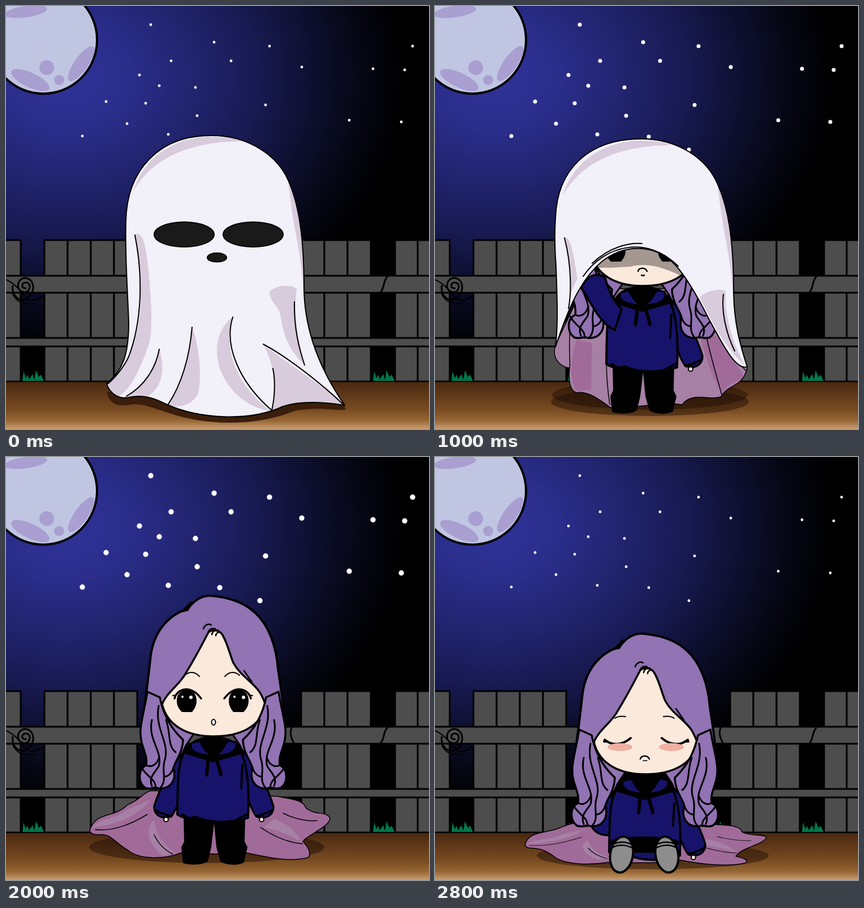
Animation, 748 px wide and 748 px high, one loop 3000 ms. Source, as an HTML page:

```html
<!DOCTYPE html>
<html lang="en">
<head>
<meta charset="utf-8">
<title>Ghost costume</title>
<style>
html, body { margin: 0; width: 100%; height: 100%; overflow: hidden; background: #000; }
svg { display: block; width: 100vw; height: 100vh; stroke-linecap: round; stroke-linejoin: round; }
</style>
</head>
<body>
<svg id="stage" viewBox="0 0 748 748"></svg>
<script>
const SHEET = '#f2f0f8', FOLD = '#d8cbdc', LINING = '#a06b99', SHEEN = '#a780a5';
const HAIR = '#9273b3', SKIN = '#fbe9dc', NAVY = '#17136b';
const STEP = 200, LOOP = 3000;

const fill = (d, color, width = 0) =>
  `<path d="${d}" fill="${color}"${width ? ` stroke="#000" stroke-width="${width}"` : ''}/>`;
const line = (d, width = 2) => `<path d="${d}" fill="none" stroke="#000" stroke-width="${width}"/>`;
const oval = (x, y, rx, ry, color, turn = 0, width = 0) =>
  `<ellipse cx="${x}" cy="${y}" rx="${rx}" ry="${ry}" fill="${color}" transform="rotate(${turn} ${x} ${y})"` +
  `${width ? ` stroke="#000" stroke-width="${width}"` : ''}/>`;
const rect = (x, y, w, h, color, width = 3) =>
  `<rect x="${x}" y="${y}" width="${w}" height="${h}" fill="${color}"${width ? ` stroke="#000" stroke-width="${width}"` : ''}/>`;
const move = (x, y, s) => `<g transform="translate(${x} ${y})">${s}</g>`;
const pair = (s, sum = 732) => s + `<g transform="translate(${sum}) scale(-1 1)">${s}</g>`;
const lerp = (a, b, k) => a + (b - a) * k;

// Blends two paths that share the same commands.
function mix(a, b, k) {
  const goal = b.match(/-?[\d.]+/g);
  let i = 0;
  return a.replace(/-?[\d.]+/g, n => +lerp(+n, +goal[i++], k).toFixed(1));
}

function scenery() {
  const planks = [-16, 68, 109, 150, 191, 522, 563, 604, 688, 728];
  const grass = 'M0 663l2-17 4 12 3-6 3 8 6-9 3 10 3-17 5 12 4-4 5 11z';
  return `<defs>
    <radialGradient id="sky" gradientUnits="userSpaceOnUse" cx="0" cy="0" r="1"
      gradientTransform="translate(105 125) scale(600 490)">
      <stop offset="0" stop-color="#2f339a"/><stop offset=".2" stop-color="#2a2d89"/>
      <stop offset=".55" stop-color="#191b55"/><stop offset=".85" stop-color="#070818"/><stop offset="1"/>
    </radialGradient>
    <linearGradient id="soil" x2="0" y2="1">
      <stop offset="0" stop-color="#482710"/><stop offset=".6" stop-color="#7a4c22"/>
      <stop offset=".82" stop-color="#966634"/><stop offset="1" stop-color="#c99d70"/>
    </linearGradient></defs>` +
    rect(0, 0, 748, 748, 'url(#sky)', 0) +
    oval(66, 60, 95, 95, '#c0c6e1', 0, 4) +
    oval(35, 10, 38, 10, '#a99fd1', -8) + oval(43, 131, 37, 13, '#a99fd1', 25) +
    oval(72, 109, 13, 13, '#a99fd1') + oval(94, 131, 9, 9, '#a99fd1') + oval(133, 102, 37, 12, '#a99fd1', -55) +
    planks.map(x => rect(x, 414, x < 0 ? 42 : 41, 250, '#4d4d4d')).join('') +
    rect(-4, 477, 756, 30, '#4d4d4d') + rect(-4, 587, 756, 15, '#4d4d4d') +
    line('M674 479C666 488 670 497 663 505M505 479C501 489 505 498 509 506', 3) +
    line('M0 484C15 490 25 503 35 515C45 525 57 520 64 513M12 510C22 528 36 527 49 526') +
    line('M35 499C26 500 27 488 36 489C46 490 43 508 31 506C15 503 20 479 36 481C54 485 52 514 30 520C17 519 10 507 12 495', 3) +
    [29, 235, 480, 649].map(x => move(x, 0, fill(grass, '#00774a'))).join('') +
    rect(0, 664, 748, 84, 'url(#soil)', 0) + line('M0 664H748', 2);
}

const STARS = [[256, 33], [368, 64], [466, 71], [719, 71], [292, 97], [398, 97], [523, 108], [649, 111],
  [705, 113], [236, 122], [271, 141], [335, 144], [177, 169], [247, 172], [459, 175], [338, 194],
  [607, 202], [699, 205], [214, 208], [287, 227], [135, 230], [378, 231], [449, 254]];
const stars = r => STARS.map(([x, y]) => oval(x, y, r, r, '#fff')).join('');

// Sheet outlines: hanging, half lifted, pulled up to the face, nearly off.
const DRAPE = [
  'M363 229C430 229 480 265 499 308C518 350 527 410 527 500C528 580 560 650 599 706C560 700 520 698 490 708C430 736 340 730 283 704C240 682 222 692 210 693C195 693 182 682 178 668C205 645 217 620 217 560C215 500 210 440 212 380C214 290 270 229 363 229Z',
  'M356 237C425 237 470 275 489 318C508 360 519 420 519 500C522 590 545 660 591 714C560 710 520 705 490 715C440 730 395 712 375 675C350 610 330 570 300 548C270 540 235 540 218 556C216 540 214 520 213 495C211 450 209 420 210 385C214 295 266 237 356 237Z',
  'M365 235C430 235 482 270 501 318C520 360 528 420 528 500C528 560 540 600 552 638C530 645 505 590 485 555C465 515 445 480 425 458C390 420 335 420 295 452C255 485 232 545 213 603C218 560 216 520 214 460C211 420 212 390 213 375C216 290 270 235 365 235Z',
  'M365 222C440 222 492 270 510 318C530 360 540 420 545 490C550 540 558 580 566 620C545 620 520 560 500 500C485 440 460 380 430 342C395 310 325 310 290 345C250 390 220 470 195 560C196 530 200 490 204 450C205 420 208 390 212 360C222 280 280 222 365 222Z'
];
const INSIDE = [
  'M220 553C212 580 225 600 237 612C230 640 240 665 260 676C280 676 300 685 310 705C340 712 380 712 400 705C410 705 420 705 430 705C440 700 460 700 470 700L480 560L300 530Z',
  'M213 600C205 625 225 640 238 640C235 665 240 680 250 684C270 680 290 695 310 710C350 712 400 700 437 705C455 680 490 700 507 690C515 670 545 675 552 640L500 500L260 500Z'
];

const crown = fill('M225 328C240 275 290 233 360 231C385 231 405 234 417 239C330 240 260 265 225 328Z', FOLD) +
  fill('M499 308C508 330 520 370 525 410C528 450 527 480 526 500C520 420 508 400 499 308Z', FOLD);
const patch = fill('M466 505C478 493 505 492 514 500C510 540 510 560 528 634C500 610 490 580 486 550C482 525 468 530 466 505Z', FOLD) +
  line('M510 523C509 570 518 605 528 635');
const tail = fill('M401 550C366 575 365 630 392 668C415 702 448 714 468 716C420 680 380 620 401 550Z', FOLD) +
  fill('M455 598C500 635 560 670 597 705C540 697 500 702 472 714C478 680 477 640 455 598Z', FOLD) +
  line('M401 550C385 600 412 665 470 715C476 690 476 660 472 641M455 598C500 622 560 670 597 705');
const pleats = fill('M228 405C237 398 245 410 250 450C258 520 260 580 252 600C235 650 215 685 195 692C185 690 178 678 178 668C215 640 240 580 238 510C238 470 235 430 228 405Z', FOLD) +
  fill('M271 607C285 650 270 680 250 690C235 686 222 688 210 692C245 670 265 640 271 607Z', FOLD) +
  fill('M329 568C345 610 345 660 340 685C330 705 310 712 285 706C310 670 325 620 329 568Z', FOLD) +
  line('M228 405C243 480 240 560 217 620C208 640 190 660 180 668M271 607C265 640 245 672 213 690M329 568C325 620 310 670 287 704');
const lifted = fill('M222 365C231 370 228 440 236 502L218 495C215 440 216 400 222 365Z', FOLD) +
  fill('M258 497C300 490 330 510 345 541C320 522 300 505 258 497Z', FOLD) +
  line('M220 372C215 420 219 460 221 490M258 497C300 490 330 510 345 541M222 546C260 520 315 530 340 578M235 541C270 529 310 538 335 575');
const gathered = fill('M229 410C240 405 245 440 252 482L238 512C240 470 236 440 229 410Z', FOLD) +
  fill('M468 515C485 500 510 500 514 505C512 560 530 600 548 636C510 600 490 560 468 515Z', FOLD) +
  line('M229 410C242 460 241 510 236 535M510 510C506 540 515 580 530 610M262 478C300 422 375 405 430 460M278 455C310 425 345 418 366 420');

const FOLDS = {
  hang: crown + pleats + patch + tail,
  rise: move(-5, -2, crown) + move(-5, -24, patch) + move(-5, 4, tail) +
    move(-4, -40, fill('M228 405C245 398 258 500 252 600L228 620C241 550 240 470 228 405Z', FOLD) + line('M228 405C243 480 240 540 230 600')),
  lift: move(-9, 8, crown) + move(-10, -45, patch) + move(-10, 8, tail) + lifted,
  open: move(1, 7, crown) + gathered
};

let clips = 0;
function ghost({ from, to = from, k = 0, folds, eyes }) {
  const d = mix(DRAPE[from], DRAPE[to], k), id = 'sheet' + clips++;
  const face = eyes ? pair(oval(eyes.x - 58, eyes.y, 53, eyes.h, '#1a1a1a', 0, 2), (eyes.x + 3) * 2) +
    oval(eyes.x, eyes.y + eyes.h * 1.85, 17, eyes.h * .36, '#1a1a1a', 0, 2) : '';
  return `<clipPath id="${id}"><path d="${d}"/></clipPath>` + fill(d, SHEET) +
    `<g clip-path="url(#${id})">${FOLDS[folds]}${face}</g>` + line(d, 2);
}
const inside = k => fill(mix(...INSIDE, k), SHEEN, 1.5) +
  fill(mix('M300 575L308 590L300 702C285 682 272 676 262 672C285 640 290 610 300 575Z',
    'M250 590L278 596L276 678C260 680 252 684 247 676C236 650 242 620 250 590Z', k), LINING) +
  (k > .4 ? fill('M470 590L505 580C515 620 540 640 546 655C530 668 515 668 508 684C485 650 480 620 470 590Z', LINING) +
    line('M306 590C300 630 304 670 309 705M480 585C490 630 500 660 507 688M508 575C520 610 535 630 550 645M240 560C235 600 240 630 238 640', 1.5) :
    line('M245 585C240 620 255 655 262 674M290 590C288 630 284 660 268 675', 1.5));

// Fallen cloth behind the girl.
const BILLOW = 'M486 355C500 362 515 375 535 378C555 385 548 410 550 430C555 460 585 455 594 475C598 500 570 525 560 550C535 590 540 620 540 636C565 660 562 690 555 705C530 716 490 714 460 708C420 700 380 690 355 680C330 690 310 700 285 695C250 690 225 670 230 645C215 625 215 600 210 580C200 565 170 565 167 545C165 525 178 510 180 500C172 470 178 445 195 432C210 415 235 410 250 402Z';
const HEAP = 'M148 660C160 625 190 640 215 615C240 605 245 590 260 590L480 600C500 605 525 605 530 620C545 635 570 625 573 640C570 655 530 670 525 680C535 690 540 700 535 708C500 718 450 705 425 700C390 705 340 700 310 700C280 712 235 712 215 695C190 680 185 665 165 668C155 668 148 665 148 660Z';
const FLAT = 'M164 685C170 660 200 665 225 655C250 645 255 645 270 645L485 648C510 650 545 648 548 662C560 670 590 665 591 672C585 685 545 690 537 705C552 708 560 712 554 717C520 725 470 718 440 712C390 720 330 715 310 716C270 722 230 718 215 705C195 690 185 692 170 690C165 688 164 687 164 685Z';

const billow = fill(BILLOW, LINING, 1.5) +
  fill('M486 375C505 405 540 415 550 432C555 455 585 455 594 475C560 455 520 445 490 425Z', SHEEN) +
  fill('M168 553C195 540 220 515 242 490L242 520C215 540 195 550 175 558Z', SHEEN) +
  fill('M212 580C240 600 270 640 290 695L310 690C282 650 270 600 255 570Z', SHEEN) +
  fill('M480 560C500 600 525 625 541 637C537 615 540 600 548 575L505 560Z', SHEEN) +
  line('M176 557C195 550 215 540 240 520M260 590C270 630 285 670 307 695M495 425C520 440 550 445 575 455M430 650C440 670 450 690 460 705M508 575C520 600 535 625 548 638', 1.5);
const heap = k => fill(mix(HEAP, FLAT, k), LINING, 1.5) +
  move(lerp(0, 14, k), lerp(0, 330, k), `<g transform="scale(1 ${lerp(1, .54, k)})">` +
    fill('M152 655C170 636 195 642 215 623L255 607C235 630 210 648 152 655Z', SHEEN) +
    fill('M262 642C245 655 250 685 278 705L300 700C275 685 265 665 262 642Z', SHEEN) +
    fill('M455 655C485 660 500 670 523 680C510 660 500 650 475 640Z', SHEEN) +
    line('M158 659C190 662 220 650 250 632M262 668C270 685 280 695 295 702M450 655C475 672 500 682 524 684M490 630C510 640 535 645 550 643', 1.5) + '</g>');
const shade = (...ovals) => `<g opacity=".45">${ovals.map(([x, y, rx, ry]) => oval(x, y, rx, ry, '#1c0d03')).join('')}</g>`;
const hemShade = fill('M178 682C182 705 200 710 225 704C260 704 290 728 360 735C430 742 480 728 510 716C550 708 580 716 600 714L598 702L300 690Z', '#3a1e0b');
const fenceShade = `<g opacity=".4">${fill('M212 590C180 590 165 602 173 630C168 645 160 655 170 661L235 664V600Z', '#111') +
  fill('M540 600C570 595 590 605 592 620C580 640 560 650 555 662L535 640Z', '#111')}</g>`;

// Girl, standing position.
const lock = fill('M250 415C244 455 233 480 240 505C244 520 250 530 248 545C233 552 233 575 246 585C258 589 262 582 270 586C292 588 302 570 296 550C300 535 312 525 313 500C300 488 280 465 272 425Z', HAIR, 3.5) +
  line('M258 465C250 500 278 520 270 547C262 560 252 566 258 582M270 440C262 480 290 505 281 535C274 555 286 570 273 585M283 465C292 490 285 510 300 522M248 545C258 550 268 543 271 530M239 548C248 565 268 572 264 586M296 550C292 562 284 566 279 565', 3);
const cap = fill('M322 268C335 250 350 243 368 246C397 249 422 258 440 275C465 297 478 335 481 375C484 395 488 420 490 440C485 455 470 458 459 452L276 452C260 460 250 455 245 440C250 405 252 385 256 350C262 310 285 280 322 268Z', HAIR, 4) +
  fill('M310 274L327 256L322 271Z', '#000', 2);
const visage = pair(oval(273, 446, 6, 11, SKIN, 0, 3)) +
  fill('M276 437C285 415 308 402 318 382C333 358 345 335 358 310C365 304 378 306 383 315C392 330 396 350 402 364C415 388 440 400 450 418C455 428 458 433 459 440C450 478 412 494 367 494C320 494 285 475 276 437Z', SKIN, 3.5) +
  line('M349 304C351 297 358 294 363 297M357 312C358 305 364 302 370 304M364 314C365 308 371 304 376 307M371 316C371 311 377 308 381 311M421 378L435 398', 2.5);

const openEyes = pair(fill('M302 431C302 405 337 405 337 431C337 440 333 446 329 451H311C306 446 302 440 302 431Z', '#000') +
  line('M298 427C303 409 326 402 345 427', 3.5) + line('M295 422L301 421', 2), 731) +
  oval(327, 425, 3, 3, '#fff') + oval(420, 425, 3, 3, '#fff') + oval(312, 424, 2, 2, '#fff') + oval(404, 424, 2, 2, '#fff');
const shutEyes = pair(line('M295 433C308 444 326 443 341 430M300 436L294 436', 4), 737);
const blush = y => pair(oval(322, y, 22, 7, '#efb0a2'), 735);
const lowBrows = pair(line('M313 395C319 391 325 391 332 392'), 731);
const frown = line('M359 468C361 461 372 461 375 468M365 475C367 476 369 476 370 475', 2.5);
const LOOKS = {
  sad: lowBrows + openEyes + frown,
  open: pair(line('M316 386C325 378 335 380 342 388'), 729) + openEyes + oval(367, 469, 3.5, 5, '#fff', 0, 2),
  smile: lowBrows + openEyes + blush(458) + line('M359 463C362 470 373 470 376 463', 2.5),
  sleep: lowBrows + shutEyes + blush(446) + line('M358 467C360 460 371 460 374 467', 2.5) + line('M363 470H370', 1.5)
};

const sleeve = fill('M316 520C292 545 270 590 262 618C262 632 272 641 292 636C304 620 308 600 316 570Z', NAVY, 3.5) +
  line('M264 625C273 628 285 636 293 634', 4) + oval(283, 641, 4, 4, SKIN, 0, 2);
const raised = fill('M318 522C300 535 285 555 270 578C272 596 290 606 312 600Z', NAVY, 3.5) +
  fill('M318 515L302 532L312 545Z', '#000') + oval(291, 520, 6, 6, SKIN, 0, 3);
const reaching = fill('M258 497C270 475 285 470 300 478C306 500 315 520 330 535L318 572C290 560 275 520 258 497Z', NAVY, 4);
const ARMS = { down: sleeve, raised, reaching };
const torso = fill('M318 518C302 540 304 580 303 632C315 640 325 640 335 636C360 648 395 648 428 638C430 600 430 550 414 518Z', NAVY, 4) +
  line('M312 632L320 637M405 643L425 632M418 545L416 585', 4);
const hood = fill('M314 524C322 500 345 494 366 494C392 494 412 502 420 524L366 540Z', '#000') +
  fill('M328 506C322 520 340 527 362 528L352 518L342 502Z', NAVY, 3) + fill('M406 504C412 520 394 527 372 528L382 518L392 502Z', NAVY, 3) +
  fill('M351 490H383V496L366 522Z', '#000') + line('M357 530C358 545 355 553 355 562M372 530C374 545 379 553 380 562', 6);
const LEGS = {
  stand: fill('M314 634H423L422 680L427 690L421 717C410 723 388 722 379 715L372 690L368 648L363 690L357 715C348 722 325 722 313 718L310 690L315 680Z', '#000'),
  sit: pair(fill('M303 690C303 657 315 647 340 647C360 647 366 660 363 690L361 710C350 722 325 722 312 717Z', '#000'), 735) + line('M354 678H382', 5),
  feet: fill('M308 680C320 668 420 668 432 680L420 700H320Z', '#000') +
    pair(oval(330, 703, 20, 32, '#8d8d8d', 10, 4) + line('M313 691C325 684 340 686 350 692M316 684C328 679 340 681 350 686', 2.5), 740)
};

function girl({ x = 0, y = 0, look = 'sad', arm = 'raised', legs = 'stand' }) {
  const right = `<g transform="translate(735) scale(-1 1)">${sleeve}</g>`;
  const nape = pair(fill('M285 465L300 550L318 510L335 485Z', HAIR, 3));
  const upper = move(x, y, nape + ARMS[arm] + right + torso + hood + cap + visage + LOOKS[look] + pair(lock) + (arm === 'reaching' ? reaching : ''));
  return legs === 'stand' ? LEGS.stand + upper : upper + LEGS[legs];
}
const faceShade = '<path d="M280 420H450V484C410 465 380 452 345 461C320 462 300 464 285 462Z" opacity=".35"/>';

const under = [210, 700, 60, 16], broad = [380, 700, 175, 25];
const pile = [355, 690, 208, 28], low = [385, 705, 205, 24];
const lifting = (k, sheet, shadow = broad) => shade(shadow) + inside(k) + girl({ arm: k > .4 ? 'reaching' : 'raised', y: 1 }) + (k > .4 ? faceShade : '') + ghost(sheet);
const S = 2.4, M = 3.5, L = 4.7;
const CELS = [
  [S, hemShade + ghost({ from: 0, folds: 'hang', eyes: { x: 373, y: 404, h: 22 } })],
  [M, lifting(0, { from: 0, to: 1, k: .4, folds: 'rise', eyes: { x: 368, y: 380, h: 20 } }, [385, 712, 205, 20])],
  [L, shade([410, 708, 180, 22], [280, 686, 52, 24]) + lifting(0, { from: 1, folds: 'lift', eyes: { x: 362, y: 349, h: 18 } }, under)],
  [M, lifting(.35, { from: 1, to: 2, k: .4, folds: 'open', eyes: { x: 364, y: 310, h: 14 } })],
  [S, lifting(.8, { from: 1, to: 2, k: .8, folds: 'open' })],
  [M, shade([380, 688, 173, 26]) + lifting(1, { from: 2, folds: 'open' })],
  [L, shade(broad) + inside(1) + girl({ y: 2, arm: 'reaching' }) + ghost({ from: 2, to: 3, k: .8, folds: 'open' })],
  [M, fenceShade + shade([265, 700, 60, 22], [495, 712, 62, 20]) + move(0, -35, billow) + girl({ y: 2 })],
  [S, fenceShade + shade([265, 700, 60, 24], [495, 712, 62, 20]) + billow + girl({ y: 2 })],
  [M, shade(pile) + `<g transform="translate(0 248) scale(1 .65)">${billow}</g>` + girl({ y: 1 })],
  [L, shade(pile) + heap(0) + girl({ look: 'open', arm: 'down' })],
  [M, shade(low) + heap(.6) + girl({ y: 28, look: 'open', arm: 'down', legs: 'sit' })],
  [L, shade(low) + heap(1) + girl({ y: 57, look: 'smile', arm: 'down', legs: 'sit' })],
  [M, shade(low) + move(-3, 0, heap(1)) + girl({ x: 3, y: 62, look: 'smile', legs: 'feet' })],
  [S, shade(low) + move(-5, 1, heap(1)) + girl({ x: 5, y: 67, look: 'sleep', legs: 'feet' })]
];

const stage = document.getElementById('stage');
stage.innerHTML = scenery() + CELS.map(([r, art]) => `<g class="cel">${stars(r)}${art}</g>`).join('');
stage.querySelectorAll('.cel').forEach((cel, i) => {
  const share = STEP / LOOP;
  cel.animate([
    { visibility: 'visible', offset: 0 }, { visibility: 'visible', offset: share },
    { visibility: 'hidden', offset: share }, { visibility: 'hidden', offset: 1 }
  ], { duration: LOOP, delay: i * STEP - LOOP, iterations: Infinity });
});
</script>
</body>
</html>
```
